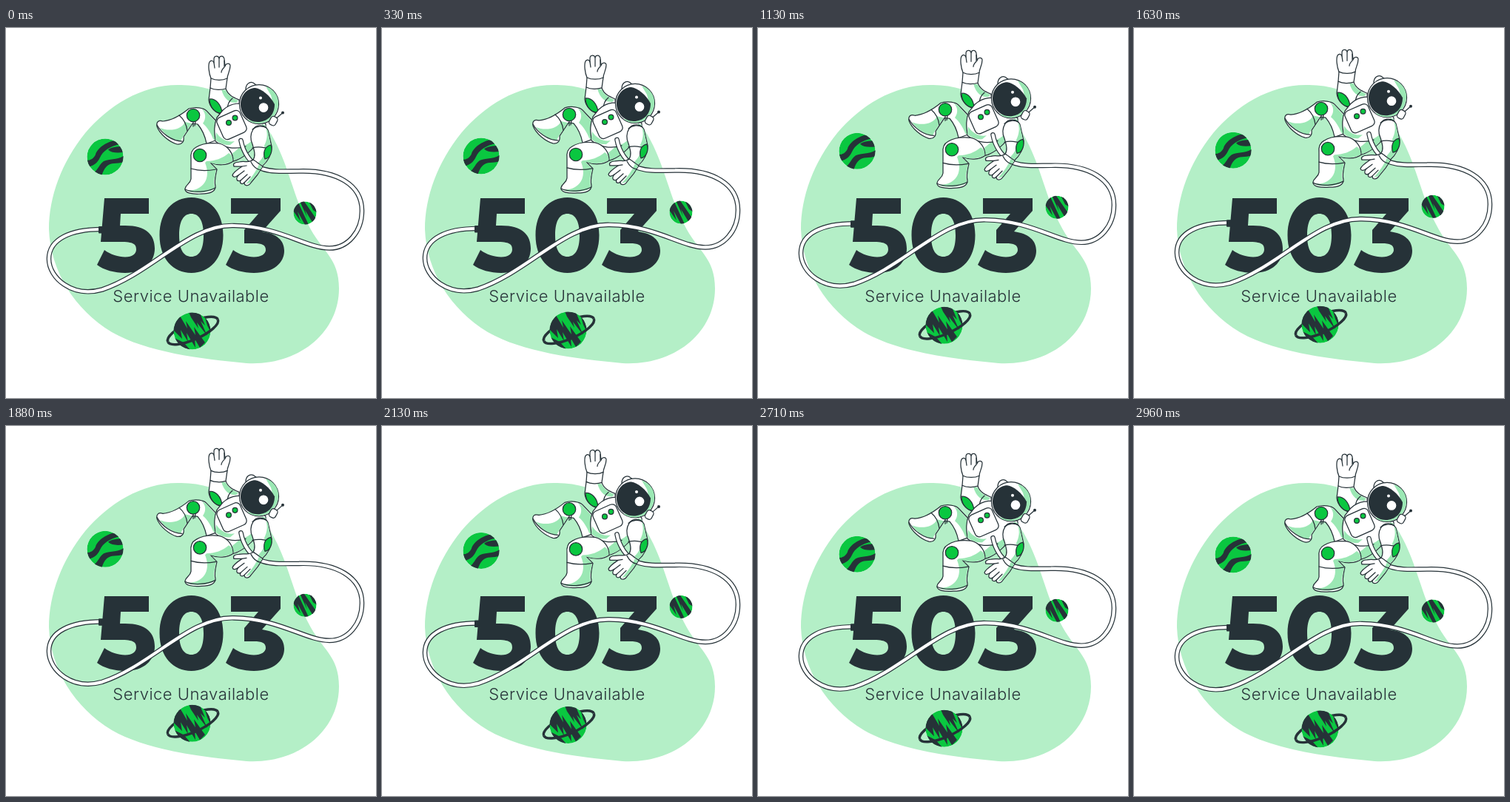
Write an HTML page that moves like this. It is 500x500 px and loops after 3000 ms.

```html
<!DOCTYPE html>
<html lang="en">
<head>
<meta charset="utf-8">
<title>503 Service Unavailable</title>
<style>
  html, body { margin: 0; width: 100%; height: 100%; overflow: hidden; background: #fff; }
  svg { display: block; width: 100%; height: 100%; }
  text { font: 300 22px Inter, "Open Sans", sans-serif; letter-spacing: .5px; text-anchor: middle; }
  text, .dark { fill: #263238; }
  .green { fill: #0ac740; }
  .shade { fill: #9be8b4; }
  .part { fill: #fff; }
  .part, .line, .joint { stroke: #263238; stroke-width: 1.25; stroke-linejoin: round; stroke-linecap: round; }
  .line { fill: none; }
  .joint { fill: #0ac740; }
  .ring { fill: none; stroke: #263238; stroke-width: 3.5; }
</style>
</head>
<body>
<svg viewBox="0 0 500 500">
  <defs>
    <clipPath id="left"><circle cx="134" cy="174" r="24.5"/></clipPath>
    <clipPath id="right"><circle cx="404" cy="250" r="15.5"/></clipPath>
    <clipPath id="low"><circle cx="251.5" cy="409.5" r="25"/></clipPath>
    <path id="cable" d="M317.500 152C320 166 330 185 347 190.500C361 195 377 193.500 396 193.500C447 192 481 212 481 247C481 275 462 297.500 437 297.500C405 297.500 370 268 308 267C248 265 197 331 130 353.500C90 365 58 338 58 312C58 285 88 272 129 272"/>
  </defs>

  <path fill="#b4efc7" d="M237 77C186 75 139 104 107 142C75 182 58 228 58 272C60 328 92 380 143 411C190 438 262 447 325 453C395 457 450 412 450 352C450 310 427 303 408 265C388 226 383 190 363 152C344 112 290 77 237 77Z"/>

  <g class="dark" role="img" aria-label="503">
    <path d="M133 230H193V251H155L154 267H161C190 267 201 280 201 298C201 316 187 331 161 331C147 331 132 327 123 320L133 300C141 306 152 309.500 161 309.500C171 309.500 176 305 176 299C176 292 172 289 155 289H128Z"/>
    <path fill-rule="evenodd" d="M250.500 229C275 229 293.500 248 293.500 280S275 331 250.500 331S207.500 312 207.500 280S226 229 250.500 229ZM250.500 251C241 251 234 259 234 280S241 309 250.500 309S267 301 267 280S260 251 250.500 251Z"/>
    <path d="M304 230H371V247L346 275C366 278 376 287 376 301C376 317 362 331 335 331C321 331 306 327 297 320L307 300C315 306 326 309.500 335 309.500C345 309.500 351 305 351 300C351 293 346 291 335 291H322V273L341 251H304Z"/>
  </g>
  <text x="250" y="370">Service Unavailable</text>

  <g id="float">
    <!-- planets -->
    <g clip-path="url(#left)">
      <circle class="green" cx="134" cy="174" r="24.500"/>
      <path class="dark" d="M109 188C118 187 124 182 127 175C131 166 140 160 154 157L147 152C135 154 123 163 121 171C119 176 114 179 109 179ZM138 164.500C143 160 150 161 160 159V168C150 169 143 169 138 164.500ZM118 196C125 191 126 184 132 180C140 176 150 179 160 172V181C150 184 142 181 136 187C132 191 131 195 129 200Z"/>
    </g>
    <g clip-path="url(#right)">
      <circle class="green" cx="404" cy="250" r="15.500"/>
      <path class="dark" d="M390 238L395 236L409 266H404L394 248L398 261L388 247ZM397 234L402 233L420 259L415 264L404 246L407 256ZM409 234L415 236L421 250L415 246Z"/>
    </g>
    <path class="ring" transform="rotate(-24 252.500 409)" d="M215.500 409A37 12 0 0 1 289.500 409"/>
    <g clip-path="url(#low)">
      <circle class="green" cx="251.500" cy="409.500" r="25"/>
      <path class="dark" d="M226 402L235 389L245 406L243 396L256 415L254 404L269 425L262 432L255 420L256 432L244 412L246 424L236 408L238 420L226 408ZM247 384L262 385L269 402L263 396L272 416L258 398L260 406L250 391ZM226 418L240 425L250 436H236ZM268 388L279 404L277 412L272 402Z"/>
    </g>
    <path class="ring" transform="rotate(-24 252.500 409)" d="M215.500 409A37 12 0 0 0 289.500 409"/>

    <!-- far leg -->
    <path class="part" d="M247 109C256 106 267 108 271 112L288 130L290 158L271 156C269 146 265 137 259 130L252 129L240 147C241 153 238 158 231 157C221 154 208 144 204 133C203 127 206 124 212 126C224 125 236 118 247 109Z"/>
    <path class="shade" d="M264 109L271 113L287 131L288 157L280 150C277 142 272 134 266 129C271 122 270 114 264 109ZM242 127L251 129L239 147L236 153C226 152 214 144 208 135C220 140 237 138 242 127Z"/>
    <path class="line" d="M204 131C210 142 224 153 238 153M234 118C240 123 244 131 245 139M253 127V133M256 127L255 132"/>
    <circle class="joint" cx="253" cy="118" r="8.700"/>

    <!-- raised arm -->
    <path class="part" d="M276 81L274 97C275 108 284 115 293 117L316 112L315 97C308 94 300 91 297 82Z"/>
    <path class="shade" d="M291 83L297 84C300 91 307 95 314 98L311 101C302 101 295 97 291 83Z"/>
    <path class="line" d="M299 111C299 104 302 98 306 95"/>
    <path class="joint" d="M275 96C283 95 291 103 292 115C283 116 275 107 275 96Z"/>
    <path class="part" d="M277 68C274 61 273 50 275 46C277 43 280 44 281 47V42C281 37 287 37 288 41C289 37 294 37 295 42L296 52C297 47 303 47 303 51C303 58 299 63 299 68L297 82C291 84 282 84 276 81Z"/>
    <path class="line" d="M281 47L282 54M288 41V53M295 44V53C293 55 291 57 291 60M277 68C283 71 293 71 299 68"/>

    <!-- torso -->
    <path class="part" d="M293 111C304 101 318 99 330 107L351 130C352 146 342 157 333 163C326 170 314 181 300 181L274 168L272 156L283 152C282 143 280 133 285 121Z"/>
    <path class="shade" d="M346 130L351 132C351 145 341 156 333 162C325 171 313 180 300 180L290 176C303 174 309 167 316 161C328 159 342 146 346 130ZM284 141C290 150 299 155 309 153L303 158C295 159 287 155 283 151Z"/>
    <path class="line" d="M283 153C292 161 308 165 324 160"/>
    <rect class="part" x="288" y="115" width="34" height="32" rx="6" transform="rotate(-24 305 131)"/>
    <circle class="joint" cx="301" cy="128" r="3.400"/>
    <circle class="joint" cx="309.500" cy="121.500" r="3.400"/>

    <!-- near leg -->
    <path class="part" d="M257 161C266 155 278 155 288 156C300 159 307 169 307 180C299 186 286 186 276 182L285 191C283 200 281 207 283 214C283 222 274 224 264 224C252 225 241 223 242 217C243 211 249 211 250 204V178C249 170 251 164 257 161Z"/>
    <path class="shade" d="M271 180C282 180 293 176 301 169C306 172 307 177 306 180C298 185 286 185 275 182L284 191L281 207L282 216C279 223 251 225 243 219C262 222 279 207 269 182Z"/>
    <path class="line" d="M250 190C260 193 273 193 284 191M242 218C253 223 271 222 283 216"/>
    <circle class="joint" cx="262" cy="172" r="8.700"/>

    <!-- tether -->
    <use href="#cable" fill="none" stroke="#263238" stroke-width="6.600" stroke-linecap="round"/>
    <use href="#cable" fill="none" stroke="#fff" stroke-width="4.200" stroke-linecap="round"/>
    <rect class="dark" x="125" y="268" width="8" height="9.500" rx="1"/>

    <!-- lower arm -->
    <path class="part" d="M334 137C338 130 350 130 354 138L359 160C359 171 354 180 346 187L334 178C338 172 335 164 333 157C330 151 330 143 334 137Z"/>
    <path class="shade" d="M351 135L354 139L358 160C359 169 354 179 346 186L341 182C349 174 351 167 349 159C353 151 354 143 351 135Z"/>
    <path class="line" d="M333 137C339 132 347 132 352 135M333 162C340 160 350 161 357 164"/>
    <path class="joint" d="M358 158C349 160 347 169 350 177C357 176 361 166 358 158Z"/>
    <path class="part" d="M334 178C328 183 323 179 315 181C310 181 306 183 308 187L319 187C313 191 307 195 306 199C307 203 311 201 314 199C310 204 312 208 317 206C315 210 319 212 322 209C322 214 328 214 331 209L340 198L347 187C343 185 338 180 334 178Z"/>
    <path class="shade" d="M342 184L346 188L339 198L330 209L324 211C331 203 338 194 342 184Z"/>
    <path class="line" d="M314 199L322 193M317 206L326 198M322 209L330 201M319 187L325 186M331 181C334 187 339 191 344 192"/>

    <!-- helmet -->
    <path class="part" d="M324 83C324 76 329 72 334 74L338 77L328 86Z"/>
    <circle class="part" cx="342" cy="103" r="26.500"/>
    <path class="shade" d="M351 79C363 83 369 93 368 104C366 120 354 129 341 129C336 129 330 127 326 124C348 127 365 111 358 91Z"/>
    <path class="dark" d="M337 81C345 82 357 91 363 103C363 118 353 127 340 127C327 127 317 116 317 103C317 91 326 81 337 81Z"/>
    <circle class="part" cx="348" cy="107.500" r="7"/>
    <circle fill="#fff" cx="344" cy="94.500" r="2"/>
    <rect class="part" x="356.500" y="119.500" width="9.500" height="12" rx="3.500" transform="rotate(28 361 125.500)"/>
    <path class="line" d="M366 121.500L374 114.500"/>
    <circle class="dark" cx="374" cy="114.500" r="2"/>
  </g>
</svg>
<script>
  const float = document.getElementById("float");
  const LOOP = 3000, LIFT = 9;

  function draw(now) {
    const y = -LIFT * (1 - Math.cos(2 * Math.PI * now / LOOP)) / 2;
    float.setAttribute("transform", `translate(0 ${y.toFixed(2)})`);
    requestAnimationFrame(draw);
  }
  requestAnimationFrame(draw);
</script>
</body>
</html>
```
